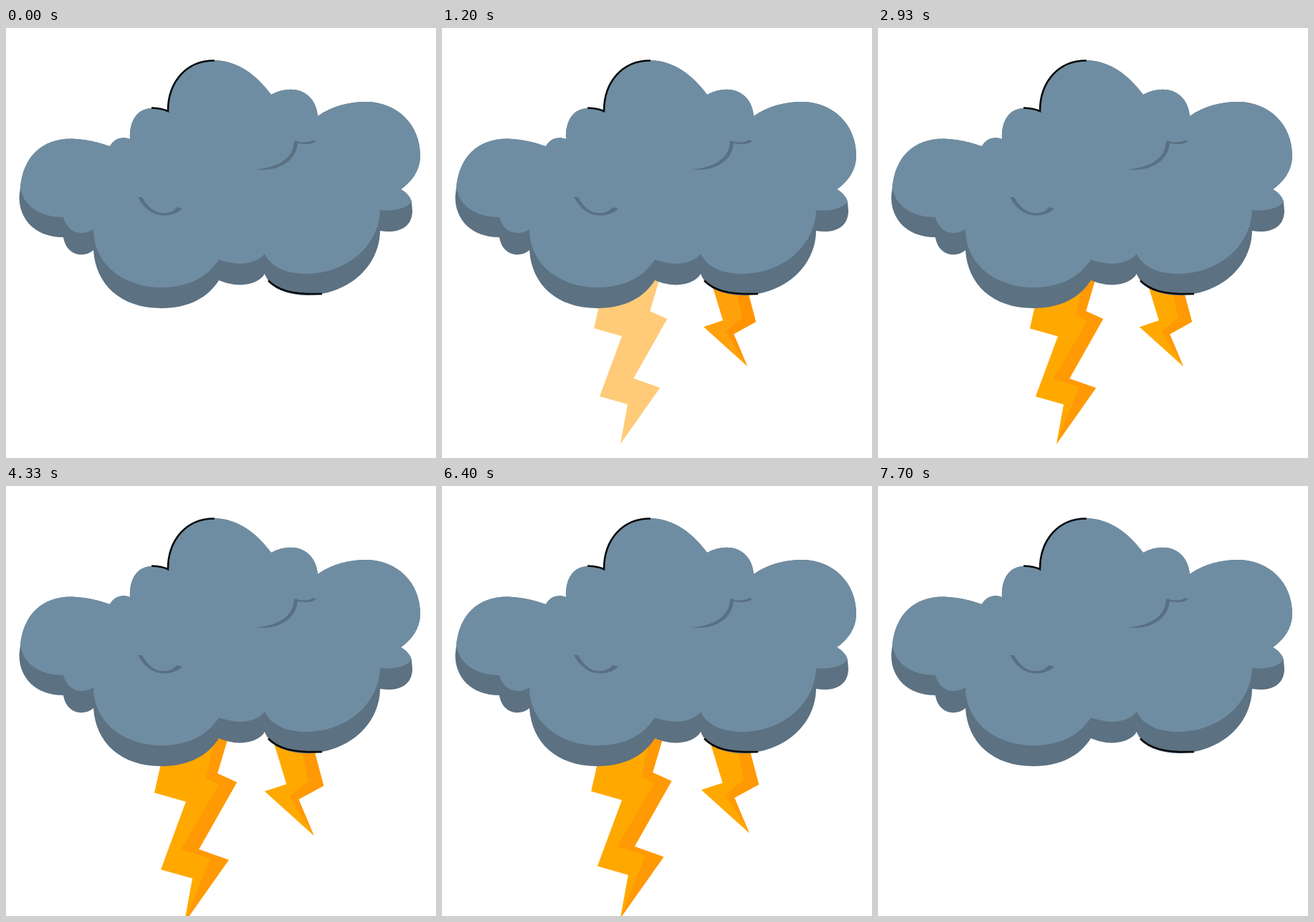
These frames come from a looping animation (600 by 600 pixels, 8010 ms). An HTML page with a canvas:

```html
<!DOCTYPE html>
<html lang="en">
<head>
<meta charset="utf-8">
<title>Storm cloud</title>
<style>
html, body { margin: 0; width: 100%; height: 100%; overflow: hidden; background: #fff; }
canvas { display: block; width: 600px; height: 600px; }
</style>
</head>
<body>
<canvas id="stage" width="600" height="600"></canvas>
<script>
const ctx = document.getElementById('stage').getContext('2d');
const LOOP = 8010, STRIKE = 2000;

const cloudTop = `M20 222 C24 180 50 154 92 154.5 C112 155 130 160 145 165
  C151 153 164 151 173 155 C172 128 184 112 204 112 C213 112 220 113 226 116
  C226 75 252 45 292 45 C324 46 350 66 370 93 C400 77 432 88 435 123
  C455 109 478 103 502 103 C546 103 578 135 578 178 C578 198 567 214 551 225
  C558 229 565 236 566 243`;
const face = new Path2D(cloudTop + ` C556 253 540 256 522 254
  C520 305 475 343 418 343 C392 343 370 334 361 315 C350 328 328 334 297 323
  C282 347 255 362 217 362 C165 362 122 330 122 281 C104 292 85 284 80 264
  C50 264 24 250 20 222Z`);
const body = new Path2D(cloudTop + ` L567 255 C567 280 545 287 522 283
  C521 335 475 373 418 373 C390 372 368 362 361 343 C352 358 325 364 297 352
  C282 376 255 391 217 391 C160 391 125 358 122 310 C108 322 84 317 80 292
  C42 292 18 268 18.5 235Z`);
const creases = new Path2D(`M184 236 L190 236 C196 248 206 257 216 258
  C226 259 234 256 238 250 L246 252 C236 262 222 263 210 260 C198 256 190 247 184 236Z
  M348 197 C378 196 402 182 402 157 L407 158 C407 186 378 202 348 197Z
  M403 157 C412 161 424 160 429 156 L433 158 C424 164 412 163 403 159Z`);
const edges = new Path2D(`M203 111.5 C213 112 220 113 226 116
  C226 75 252 45 291 45.5 M366 352.5 C379 366 398 372 441 371`);

const bigBolt = {
  x: 251, y: 348,
  shape: new Path2D('M228 348 L212 419 L251 430 L220 514 L259 525 L249 580 L304 502 L267 489 L314 406 L290 395 L304 348Z'),
  facet: new Path2D('M287 348 L276 401 L292 409 L245 489 L281 500 L249 580 L304 502 L267 489 L314 406 L290 395 L304 348Z'),
  flash: [[255, 204, 124], [255, 204, 124]]
};
const smallBolt = {
  x: 397, y: 346,
  shape: new Path2D('M373 346 L392 408 L365 417 L426 472 L407 427 L438 410 L421 346Z'),
  facet: new Path2D('M407 346 L419 404 L396 423 L426 472 L407 427 L438 410 L421 346Z'),
  flash: [[255, 161, 10], [255, 148, 0]]
};
const BASE = [255, 168, 0], SHADE = [255, 153, 4];

const mix = (a, b, k) => `rgb(${a.map((v, i) => Math.round(v + (b[i] - v) * k))})`;

// Springs in with one overshoot, rests, then shrinks away.
function boltScale(p) {
  if (p < 20 || p >= 1700) return 0;
  if (p > 1480) return 1 - ((p - 1480) / 220) ** 2;
  const rise = 315, overshoot = 0.128;
  const decay = -Math.log(overshoot), t = (p - 20) / rise, a = Math.PI * t;
  return 1 - Math.exp(-decay * t) * (Math.cos(a) + decay / Math.PI * Math.sin(a));
}

function flashAmount(p) {
  const u = (p - 965) / 365;
  return u > 0 && u < 1 ? Math.min(1, 1.08 * Math.sin(Math.PI * u)) : 0;
}

function drawBolt(bolt, scale, flash) {
  if (scale <= 0) return;
  ctx.save();
  ctx.translate(bolt.x, bolt.y);
  ctx.scale(scale, scale);
  ctx.translate(-bolt.x, -bolt.y);
  ctx.fillStyle = mix(BASE, bolt.flash[0], flash);
  ctx.fill(bolt.shape);
  ctx.fillStyle = mix(SHADE, bolt.flash[1], flash);
  ctx.fill(bolt.facet);
  ctx.restore();
}

function drawCloud() {
  ctx.fillStyle = '#5c7182';
  ctx.fill(body);
  ctx.fillStyle = '#6f8da2';
  ctx.fill(face);
  ctx.fillStyle = '#587082';
  ctx.fill(creases);
  ctx.strokeStyle = '#080a0c';
  ctx.lineWidth = 2.6;
  ctx.stroke(edges);
}

// Poses hold for 30 ms and 70 ms in turn.
function heldTime(t) {
  const start = Math.floor(t / 100) * 100;
  return t - start >= 30 ? start + 30 : start;
}

function draw(now) {
  const t = heldTime(now % LOOP);
  const p = t >= 4 * STRIKE ? STRIKE - 1 : t % STRIKE;
  const scale = boltScale(p), flash = flashAmount(p);
  ctx.fillStyle = '#fff';
  ctx.fillRect(0, 0, 600, 600);
  drawBolt(bigBolt, scale, flash);
  drawBolt(smallBolt, scale, flash);
  drawCloud();
}

const origin = performance.now();
function tick() {
  draw(performance.now() - origin);
  requestAnimationFrame(tick);
}
tick();
</script>
</body>
</html>
```
